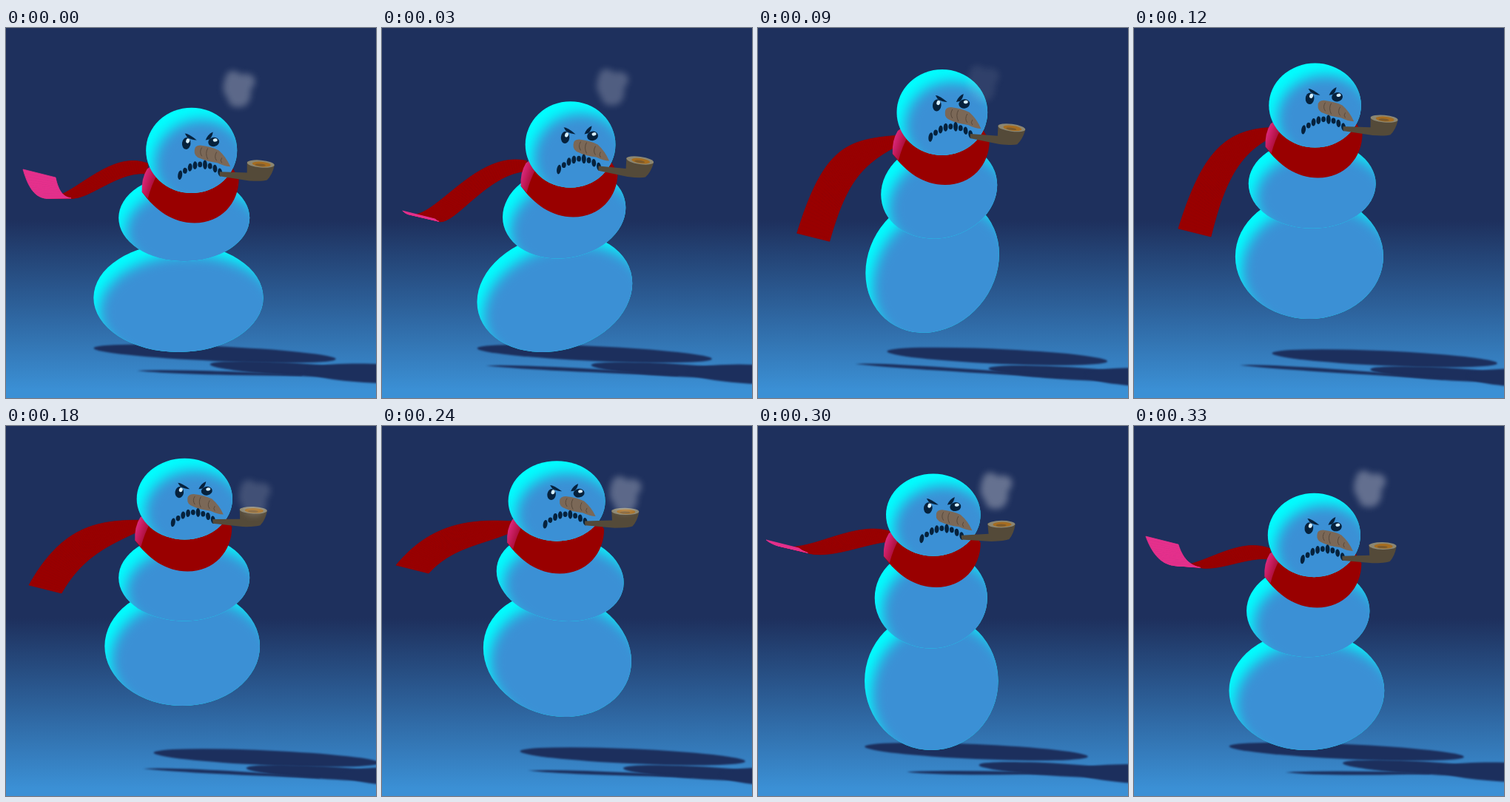
An HTML page with a canvas that plays this animation: 500x500 px, repeating every 0.36 s.

```html
<!DOCTYPE html>
<html lang="en">
<head>
<meta charset="utf-8">
<title>Grumpy snowman</title>
<style>
html, body { margin: 0; width: 100%; height: 100%; overflow: hidden; background: #1e305d; }
canvas { display: block; width: 500px; height: 500px; }
</style>
</head>
<body>
<canvas id="stage" width="500" height="500"></canvas>
<script>
const ctx = document.getElementById('stage').getContext('2d');
const LOOP = 360, STEP = 30, GROUND = 438;
const ICE = '#3b90d5', DARK = '#06223d', RED = '#990000', PINK = '#e5308c', SHADE = '#1c2f5d';

// Looping motion: a mean plus cosine and sine harmonics
function wave(t, mean, cosines, sines = []) {
  const sum = (amps, f) => amps.reduce((s, a, i) => s + a * f((i + 1) * t / LOOP * 2 * Math.PI), 0);
  return mean + sum(cosines, Math.cos) + sum(sines, Math.sin);
}

// Soft bump, 120 ms wide
function pulse(t, center) {
  const d = Math.abs(t - center);
  return d < 60 ? Math.cos(Math.PI * d / 120) : 0;
}

// The snowman hops from 60 to 300 ms; each ball keeps its area as it squashes
function poseAt(t) {
  const u = (t - 60) / 240, lift = Math.max(0, 240 * u * (1 - u));
  const baseW = wave(t, 100, [0, 9.75, 4.9]), baseH = 8430 / baseW;
  const bellyW = wave(t, 83.5, [-3.3, 5, 3.3]);
  const headH = wave(t, 56.3, [1.4], [1.6]);
  return {
    lift,
    base: {
      x: wave(t, 235.6, [-2.6]), y: GROUND - lift - baseH, w: baseW, h: baseH,
      slant: 9 * pulse(t, 240) - 18 * pulse(t, 60)
    },
    belly: {
      x: wave(t, 240.7, [], [4, 4]), y: wave(t, 223.6, [25.8, 7.2], [2.3, -1.7]), w: bellyW, h: 5180 / bellyW,
      slant: 8 * pulse(t, 240) - 9 * pulse(t, 60)
    },
    head: {
      x: wave(t, 243.8, [4.7, 2.2], [7.2, 2.3]), y: wave(t, 120.6, [30.2, 11.4, 3.2], [4.8, 3]),
      w: 3550 / headH, h: headH, slant: 0
    },
    pipeAngle: wave(t, -.015, [.02], [.066, .03]),
    tip: {
      x: wave(t, 30.2, [-7.8, -3.2, 3.8], [19.3, -4.3]),
      y: wave(t, 215.7, [-13, -12.7, 1], [58.9, 11, 10])
    },
    curl: wave(t, -28, [80, 41.5, 10.7], [-42, -18, 6])
  };
}

function fill(path, color) {
  ctx.fillStyle = color;
  ctx.fill(path instanceof Path2D ? path : new Path2D(path));
}

function oval(x, y, rx, ry, color, angle = 0) {
  ctx.fillStyle = color;
  ctx.beginPath();
  ctx.ellipse(x, y, rx, ry, angle, 0, 7);
  ctx.fill();
}

function ball({ x, y, w, h, slant }) {
  const circle = new Path2D(), shape = new Path2D();
  circle.arc(0, 0, 1, 0, 7);
  shape.addPath(circle, new DOMMatrix([w, slant, 0, Math.sqrt(h * h - slant * slant), x, y]));
  ctx.save();
  fill(shape, '#00ffff');
  ctx.clip(shape);
  ctx.filter = 'blur(9px)';
  ctx.translate(x + 14, y + 19);
  ctx.scale(1.06, 1.06);
  ctx.translate(-x, -y);
  fill(shape, ICE);
  ctx.restore();
}

function backdrop() {
  const sky = ctx.createLinearGradient(0, 0, 0, 500);
  sky.addColorStop(.52, '#1e305d');
  sky.addColorStop(.98, ICE);
  ctx.fillStyle = sky;
  ctx.fillRect(0, 0, 500, 500);
}

function shadows({ lift, base, belly, tip }) {
  ctx.save();
  ctx.filter = 'blur(1px)';
  const left = base.x - base.w + 1.1 * lift, right = 446 + lift;
  oval((left + right) / 2, 440 + .14 * lift, (right - left) / 2, 10, SHADE, .045);
  const rise = 257 - belly.y, x = 275 + .95 * rise, y = 453 + .15 * rise;
  oval(x + 110, y + 8, 110, 8.5, SHADE, .06);
  oval(x + 228, y + 14, 98, 13, SHADE, .04);
  const swing = 191 - tip.y, sx = 177 + .65 * swing + .4 * lift, sy = 463 + .12 * swing + .05 * lift;
  const ex = 400 + .4 * lift, ey = 469 + .1 * lift;
  fill(`M${sx} ${sy} Q${sx + 40} ${sy - 3} ${ex} ${ey - 1} L${ex} ${ey + 1} Q${sx + 50} ${sy + 6} ${sx} ${sy}`, SHADE);
  ctx.restore();
}

// A ribbon between two cubics; the side that faces us sets its colour
function tail({ head, tip, curl }) {
  const root = { x: head.x - 59, y: head.y + 24 - .06 * curl };
  const upper = [
    [root.x, root.y], [120, root.y - 12 - .15 * curl],
    [66 + .5 * (tip.x - 30) - .1 * curl, tip.y + curl], [tip.x, tip.y]];
  const offsets = [[-1, 14], [17, 35], [29, 12 - .35 * curl], [44, 11]];
  const lower = upper.map(([x, y], i) => [x + offsets[i][0], y + offsets[i][1]]);
  const point = ([a, b, c, d], t) => [0, 1].map(k => {
    const u = 1 - t;
    return u * u * u * a[k] + 3 * u * u * t * b[k] + 3 * u * t * t * c[k] + t * t * t * d[k];
  });
  const N = 60;
  ctx.lineWidth = .8;
  for (let i = 0; i < N; i++) {
    const a = point(upper, i / N), b = point(lower, i / N);
    const c = point(lower, (i + 1) / N), d = point(upper, (i + 1) / N);
    const side = (c[0] + d[0] - a[0] - b[0]) * (b[1] - a[1]) - (c[1] + d[1] - a[1] - b[1]) * (b[0] - a[0]);
    const strip = new Path2D(`M${a}L${b}L${c}L${d}Z`);
    ctx.strokeStyle = side > 0 ? PINK : RED;
    fill(strip, ctx.strokeStyle);
    ctx.stroke(strip);
  }
}

function collar() {
  fill('M-56 21 L-67 56 C-49 81 -25 98 4 98 C40 98 64 71 64 38 L50 15Z', RED);
  const knot = ctx.createLinearGradient(-67, 36, -47, 43);
  knot.addColorStop(0, '#e02c84');
  knot.addColorStop(1, '#a3082c');
  fill('M-60 25 Q-68 38 -67 56 L-59 65 Q-54 46 -46 32 L-53 20Z', knot);
}

function pipe(angle) {
  ctx.save();
  ctx.translate(38, 31);
  ctx.rotate(angle);
  fill('M0 -2 L37 -1 L37 -16 L74 -11 Q71 2 64 9 Q58 11 40 10 L0 4Z', '#544a39');
  oval(55.5, -13, 18.5, 5, '#8b8672', .08);
  oval(56.5, -12.5, 12.5, 3.4, '#a66d20', .08);
  oval(55, -11.5, 7, 1.6, '#7c5a2c', .08);
  ctx.restore();
}

function face() {
  oval(-7, -9.5, 5.8, 8, DARK, .1);
  oval(-5, -13, 2.4, 3.2, '#d5efff', .3);
  oval(30, -11.5, 7.5, 6.2, DARK, -.2);
  oval(32, -14, 3, 2.2, '#d5efff', -.2);
  fill('M-9 -23 Q-4 -23 7 -14 Q0 -14 -6 -18Z', DARK);
  fill('M19 -14 Q22 -22 29 -25 Q28 -18 24 -15Z', DARK);
  fill('M4 0 Q4 -7 12 -7 Q28 -5 37 0 Q47 9 52.5 22 Q45 22 35 17 Q20 15 12 11 Q3 8 4 0Z', '#7b6857');
  ctx.strokeStyle = '#57483b';
  ctx.lineWidth = 1;
  ctx.stroke(new Path2D('M14 -4 Q10 2 14 8 M22 -3 Q18 4 22 12 M34 2 Q30 9 34 14 M41 10 Q38 14 41 17'));
  for (let i = 0; i < 9; i++) {
    const bend = (i - 4.3) / 4.3;
    oval(-15.5 + 6.75 * i, 19 + 14.5 * bend * bend, 2.9, 5 + 1.3 * Math.cos(2.5 * i), DARK, -.15 * bend);
  }
}

// One puff leaves the bowl at 120 ms and drifts up until the next
function smoke(t) {
  const age = (t + 240) % LOOP / LOOP;
  ctx.save();
  ctx.translate(342 - 42 * age, 102 - 30 * age);
  ctx.scale(1.1, 1.1);
  ctx.globalAlpha = .34 * Math.sin(Math.PI * age);
  ctx.filter = 'blur(4px)';
  fill('M-13 -20 Q-4 -25 3 -17 Q13 -21 20 -13 Q22 -4 15 1 Q17 12 10 20 Q0 26 -10 20 Q-14 10 -18 4 Q-20 -8 -13 -20Z', '#f0f0f4');
  ctx.restore();
}

function draw(t) {
  const pose = poseAt(t), { head } = pose;
  backdrop();
  shadows(pose);
  ball(pose.base);
  ball(pose.belly);
  tail(pose);
  ctx.save();
  ctx.translate(head.x, head.y);
  collar();
  ctx.restore();
  ball(head);
  ctx.save();
  ctx.translate(head.x, head.y);
  ctx.scale(1, head.h / 58);
  face();
  pipe(pose.pipeAngle);
  ctx.restore();
  smoke(t);
}

function tick() {
  const t = performance.now() % LOOP;
  draw(Math.floor(t / STEP) * STEP);
  requestAnimationFrame(tick);
}
tick();
</script>
</body>
</html>
```
